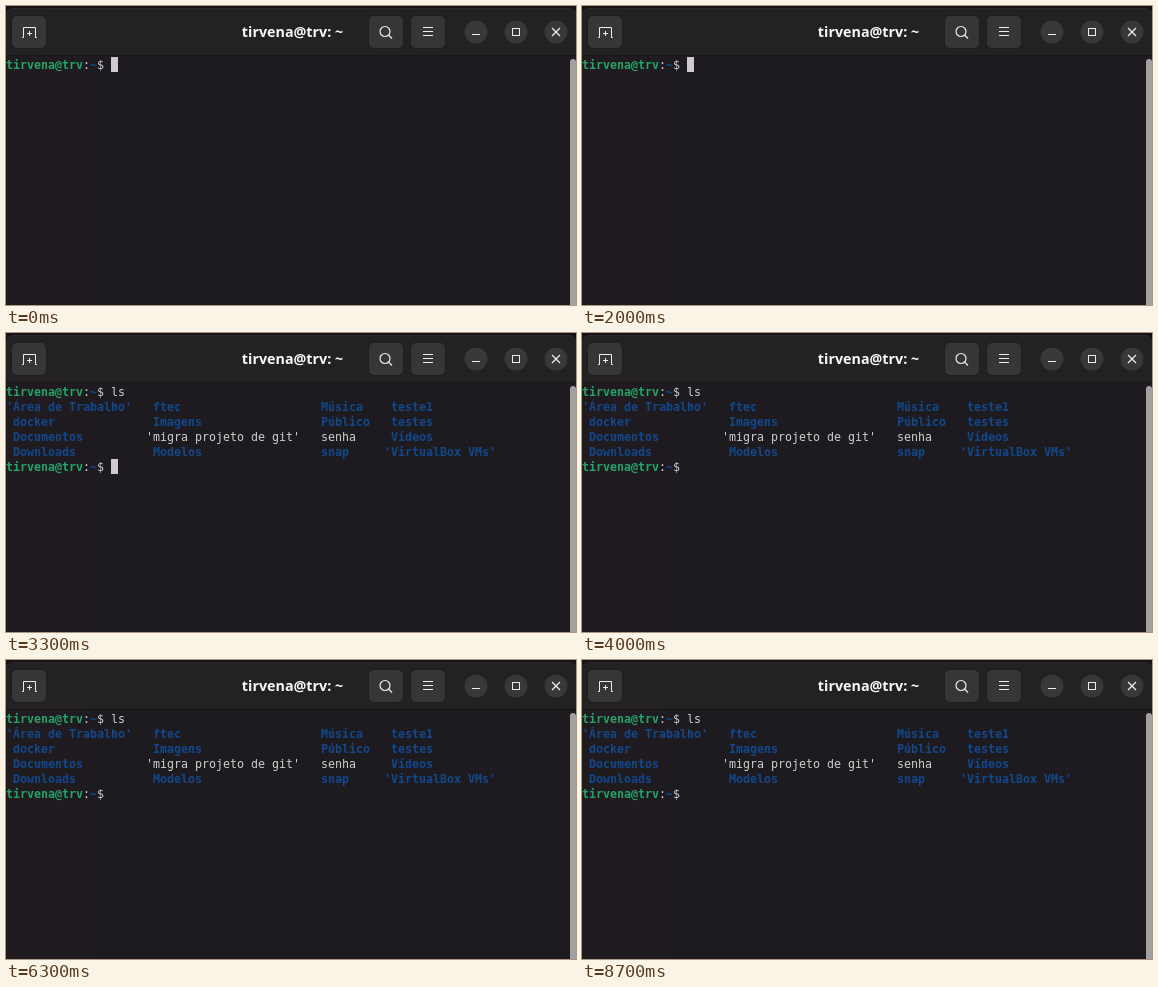
Animation, 570 px wide and 299 px high, one loop 8900 ms. Source, as an HTML page with a canvas:

```html
<!DOCTYPE html>
<html lang="pt-BR">
<head>
<meta charset="utf-8">
<title>Terminal</title>
<style>
  html, body { margin: 0; width: 570px; height: 299px; overflow: hidden; background: #1e1b20; }
  body { position: relative; }
  canvas { position: absolute; left: 0; top: 0; }
  #title {
    position: absolute; left: 136.5px; top: 9px; width: 300px;
    font: bold 14.3px/33px "Noto Sans", "Open Sans", sans-serif;
    text-align: center; white-space: pre; color: #f8f8f6;
  }
  #screen {
    position: absolute; left: 0; top: 52px; margin: 0;
    font: 11.63px/15px "DejaVu Sans Mono", monospace; color: #d0cfcc;
  }
  #screen div { height: 15px; white-space: pre; }
  .user { color: #26a269; font-weight: bold; }
  .dir { color: #12488b; font-weight: bold; }
  #cursor { position: absolute; width: 7px; height: 15px; background: #cfcbcc; }
</style>
</head>
<body>
<canvas id="chrome" width="570" height="299"></canvas>
<div id="title"></div>
<div id="screen"></div>
<div id="cursor"></div>
<script>
const LOOP = 8900, CELL = 7, ROW = 15, TOP = 51;
const HOST = 'tirvena@trv';
const PROMPT = `<span class="user">${HOST}</span>:<span class="dir">~</span>$ `;
const PROMPT_COLS = HOST.length + 4;

// [column, name, plain file?]
const LISTING = [
  [[0, "'Área de Trabalho'"], [21, 'ftec'], [45, 'Música'], [55, 'teste1']],
  [[1, 'docker'], [21, 'Imagens'], [45, 'Público'], [55, 'testes']],
  [[1, 'Documentos'], [20, "'migra projeto de git'", true], [45, 'senha', true], [55, 'Vídeos']],
  [[1, 'Downloads'], [21, 'Modelos'], [45, 'snap'], [54, "'VirtualBox VMs'"]]
];

const TYPE_L = 2900, TYPE_S = 3000, ENTER = 3300;
// The cursor starts visible and flips at each time
const FLIPS = [200, 800, 1400, 2000, 2600, 2900, 3900, 4500, 5100, 5700, 6300, 6900, 7500, 8200, 8700];

const screenEl = document.getElementById('screen');
const cursorEl = document.getElementById('cursor');
document.getElementById('title').textContent = HOST + ': ~';

function listRow(items) {
  let col = 0, html = '';
  for (const [at, name, plain] of items) {
    html += ' '.repeat(at - col) + (plain ? name : `<span class="dir">${name}</span>`);
    col = at + name.length;
  }
  return html;
}

function drawChrome() {
  const c = document.getElementById('chrome').getContext('2d');
  const rect = (x, y, w, h, color) => { c.fillStyle = color; c.fillRect(x, y, w, h); };
  const round = (x, y, w, h, r, color) => {
    c.fillStyle = color;
    c.beginPath();
    c.roundRect(x, y, w, h, r);
    c.fill();
  };
  const line = (...p) => {
    c.beginPath();
    for (let i = 0; i < p.length; i += 2) c.lineTo(p[i], p[i + 1]);
    c.stroke();
  };

  const bg = c.createLinearGradient(0, 0, 100, 0);
  bg.addColorStop(0, '#201b1f');
  bg.addColorStop(1, '#1e1b20');
  rect(0, 0, 570, 299, bg);

  rect(0, 0, 570, 4, '#151315');
  round(0, 2, 570, 47, [7, 7, 0, 0], '#2a2829');
  round(0, 3, 570, 46, [7, 7, 0, 0], '#232122');
  rect(0, 49, 570, 1, '#191718');
  round(564, 53, 6, 252, 3, '#a3a09f');

  for (const x of [6, 363, 405]) {
    round(x - 1, 9, 36, 34, 6, '#1f1d1e');
    round(x, 10, 34, 32, 5, '#373536');
  }
  for (const x of [470, 510, 550]) round(x - 11.5, 14.5, 23, 23, 11.5, '#393738');

  c.strokeStyle = '#eeeceb';
  c.lineWidth = 1;
  line(16, 31.5, 17.5, 31.5, 17.5, 21.5, 29.5, 21.5, 29.5, 31.5, 31, 31.5);
  line(21, 27.5, 26, 27.5);
  line(23.5, 25, 23.5, 30);

  c.lineWidth = 1.2;
  c.beginPath();
  c.arc(379, 25.5, 5, 0, Math.PI * 2);
  c.stroke();
  line(382.5, 29, 386, 32.5);

  c.lineWidth = 1;
  for (const y of [21.5, 25.5, 29.5]) line(417, y, 427, y);
  line(466, 28.5, 474, 28.5);
  c.strokeRect(506.5, 22.5, 7, 7);
  c.lineWidth = 1.2;
  line(546, 22, 554, 30);
  line(554, 22, 546, 30);
}

let shown = '';
function render(t) {
  const typed = t >= TYPE_S ? 'ls' : t >= TYPE_L ? 'l' : '';
  const rows = [PROMPT + typed];
  const done = t >= ENTER;
  if (done) rows.push(...LISTING.map(listRow), PROMPT);

  const html = rows.map(r => `<div>${r}</div>`).join('');
  if (html !== shown) screenEl.innerHTML = shown = html;

  const col = PROMPT_COLS + (done ? 0 : typed.length);
  const on = FLIPS.filter(f => f <= t).length % 2 === 0;
  cursorEl.style.left = col * CELL + 'px';
  cursorEl.style.top = TOP + (rows.length - 1) * ROW + 'px';
  cursorEl.style.visibility = on ? 'visible' : 'hidden';
}

const start = performance.now();
function tick() {
  render((performance.now() - start) % LOOP);
  requestAnimationFrame(tick);
}
drawChrome();
tick();
</script>
</body>
</html>
```
